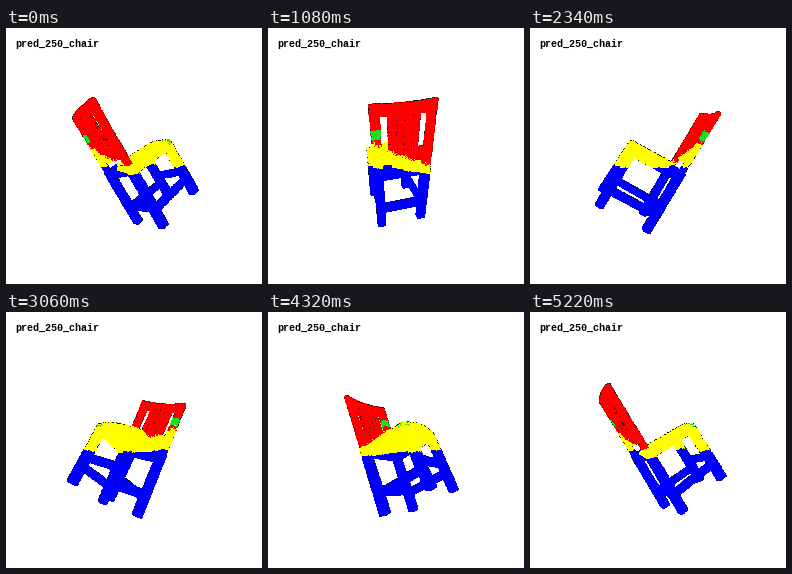
These frames come from a looping animation (256x256 px, 5400 ms). A matplotlib script:

```python
import numpy as np
import matplotlib.pyplot as plt
from matplotlib.animation import FuncAnimation

SIZE, FRAMES, STEP = 256, 30, 180
CAM = 240  # camera distance from the turning axis

rng = np.random.default_rng(7)
WHITE, RED, YELLOW, BLUE, GREEN, BLACK, MAROON = range(7)
PALETTE = np.array([
    [255, 255, 255], [255, 0, 0], [255, 255, 0], [0, 0, 255],
    [30, 220, 30], [20, 20, 10], [110, 0, 0]], np.uint8)

# Corner points of the leaning chair: x right, y up, z towards the viewer
BACK_TOP = np.array([[-61, 40, -2], [-34, 48, 46]])
BACK_FOOT = np.array([[2.5, -71, -19.5], [28.5, -64, 21.7]])
FRONT_TOP = np.array([[9, 8, -35.5], [34.5, 15.5, 5]])
FRONT_FOOT = np.array([[40.5, -44.5, -45], [65.5, -35, -7]])
FORWARD = np.array([.72, .49, -.49])
SEAT = .49


def mix(p, q, t):
    return p + (q - p) * t


def place(a, d, h):
    """Map width a, depth d (0 = back) and height h to space."""
    a, d, h = a[:, None], d[:, None], h[:, None]
    back = mix(mix(*BACK_FOOT, a), mix(*BACK_TOP, a), h)
    front = mix(mix(*FRONT_FOOT, a), mix(*FRONT_TOP, a), h / SEAT)
    bend = 16 * a * (1 - a) * np.clip((h - .5) / .5, 0, 1) * (1 - d)
    return mix(back, front, d) - FORWARD * bend


def block(a0, a1, d0, d1, h0, h1, density=4):
    """Random points on the six faces of a block."""
    low, high = np.array([a0, d0, h0]), np.array([a1, d1, h1])
    size = (high - low) * [54, 52, 128]
    area = np.prod(size) / size
    n = int(2 * area.sum() * density)
    u = rng.random((n, 3))
    axis = rng.choice(3, n, p=area / area.sum())
    u[np.arange(n), axis] = rng.integers(0, 2, n)
    return low + u * (high - low)


def build():
    parts = [block(0, 1, -.02, 1, .435, SEAT)]
    for a in (0, .87):
        parts += [
            block(a, a + .13, -.05, .07, 0, .5),
            block(a + .005, a + .125, -.03, .03, .5, .99),
            block(a, a + .13, .89, 1.01, 0, .47),
            block(a + .03, a + .1, 0, 1, .115, .16)]
    parts += [
        block(0, 1, -.03, .05, .135, .19),
        block(0, 1, .92, .99, .185, .23),
        block(0, 1, -.03, .03, .92, .99),
        block(0, 1, -.03, .03, .57, .66),
        block(.26, .73, -.02, .02, .62, .95)]
    return np.concatenate(parts)


def classify(a, d, h, y):
    n = len(a)
    label = np.full(n, YELLOW)
    back = (d < .15) & (h > .5)
    red = back & (h > .74 - .25 * a + rng.normal(0, .012, n))
    label[red] = RED
    label[back & (a < .14) & (abs(h - .8) < .035)] = GREEN
    label[(a > .84) & (d > .9) & (h > .46) & (rng.random(n) < .4)] = GREEN
    label[~red & (y < -10 - 6 * a * (1 - d))] = BLUE
    seam = (a > .26) & (a < .74) & (((a - .25) / .12) % 1 < .09) & (h < .94)
    label[red & seam & (rng.random(n) < .35)] = MAROON
    return label


a, d, h = build().T
points = place(a, d, h)
labels = classify(a, d, h, points[:, 1])
seat_top = (h > .48) & (h <= SEAT) & (d > .1)
points[seat_top, 1] += 3 * np.sin(np.pi * np.clip(a, 0, 1))[seat_top]


def render(i):
    t = 2 * np.pi * i / FRAMES
    x, y, z = points.T
    px = x * np.cos(t) + z * np.sin(t)
    pz = z * np.cos(t) - x * np.sin(t)
    s = 1 / (1 - pz / CAM)
    order = np.argsort(pz)
    col = np.floor(SIZE / 2 + px * s - .5).astype(int)[order, None] + [0, 1, 0, 1]
    row = np.floor(SIZE / 2 - y * s - .5).astype(int)[order, None] + [0, 0, 1, 1]
    img = np.zeros((SIZE, SIZE), int)
    img[row.ravel(), col.ravel()] = np.repeat(labels[order], 4)

    # speckled dark rim
    solid = img > 0
    top = solid & ~np.roll(solid, 1, 0)
    side = solid & ~(np.roll(solid, 1, 1) & np.roll(solid, -1, 1))
    noise = np.random.default_rng(i).random(img.shape)
    img[(top & (noise < .45)) | (side & (noise < .25))] = BLACK
    return PALETTE[img]


fig = plt.figure(figsize=(SIZE / 100, SIZE / 100), dpi=100, facecolor="white")
ax = fig.add_axes([0, 0, 1, 1])
ax.set_axis_off()
view = ax.imshow(render(0), extent=(0, SIZE, SIZE, 0),
                 interpolation="nearest", aspect="auto")
ax.text(9.2, 18.7, "pred_250_chair", family="Liberation Mono",
        weight="bold", size=7.2, color="black", va="baseline")


def update(i):
    view.set_data(render(i))
    return [view]


anim = FuncAnimation(fig, update, frames=FRAMES, interval=STEP,
                     repeat=True, repeat_delay=0)
plt.show()
```
